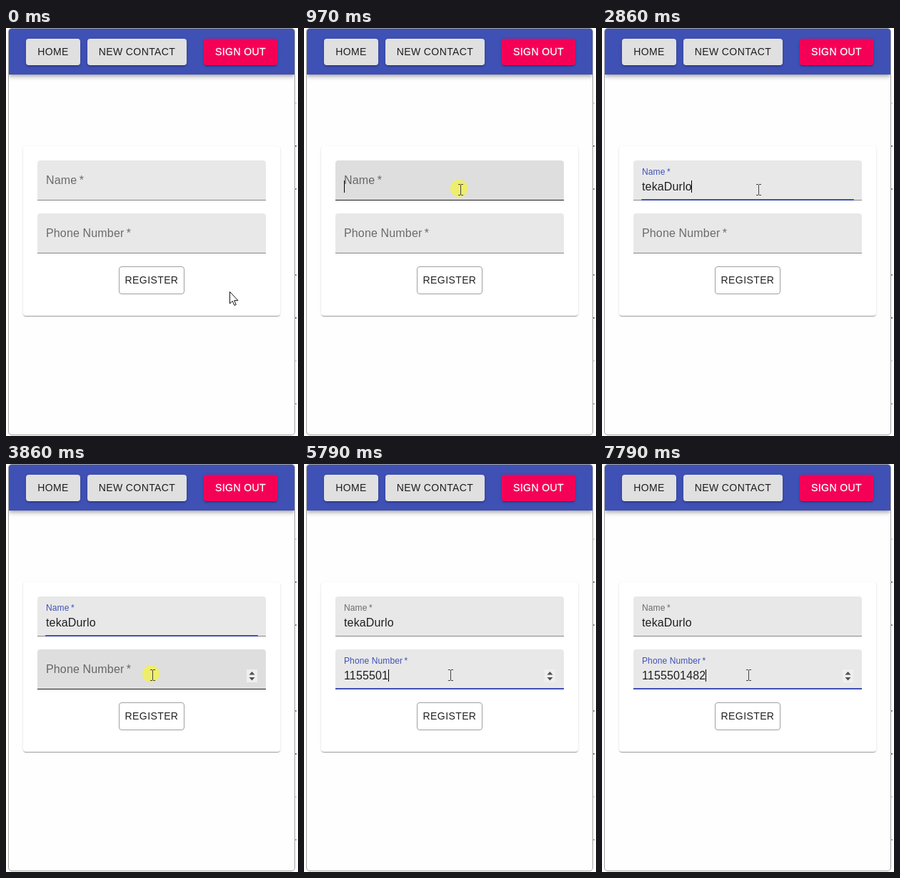
These frames come from a looping animation (409x570 px, 7.99 s). An HTML page:

```html
<!DOCTYPE html>
<html lang="en">
<head>
<meta charset="utf-8">
<title>Contact form</title>
<style>
  html, body { margin: 0; width: 100%; height: 100%; overflow: hidden; background: #fff; }
  body { position: relative; font: 16px/1 "Liberation Sans", Arial, sans-serif; color: rgba(0,0,0,.87); }
  body * { box-sizing: border-box; }
  .stage { position: absolute; left: 0; top: 0; width: 409px; height: 570px; overflow: hidden; }
  .stage div, .stage svg { position: absolute; }
  .speck { left: 405px; width: 2px; height: 2px; background: #777; }
  .page { left: 3px; top: 0; width: 402px; height: 569px; border: 1px solid #a3a3a3; border-radius: 5px; background: #fefefe; overflow: hidden; }
  .bar { left: 0; top: 0; width: 400px; height: 64px; background: #3f51b5;
    box-shadow: 0 2px 4px -1px rgba(0,0,0,.2), 0 4px 5px rgba(0,0,0,.14), 0 1px 10px rgba(0,0,0,.12); }
  .btn { top: 15px; height: 37px; border-radius: 4px; background: #e0e0e0; font-size: 14px; line-height: 37px;
    letter-spacing: .4px; text-align: center; white-space: nowrap;
    box-shadow: 0 3px 1px -2px rgba(0,0,0,.2), 0 2px 2px rgba(0,0,0,.14), 0 1px 5px rgba(0,0,0,.12); }
  .home { left: 28px; width: 76px; }
  .new { left: 114px; width: 139px; }
  .out { left: 277px; width: 103px; background: #f50057; color: #fff; -webkit-text-stroke: .3px #fff; }
  .register { left: 158px; top: 333px; width: 92px; height: 39px; border: 1px solid #a0a0a0; background: #fff; box-shadow: none; }
  .card { left: 24px; top: 165px; width: 360px; height: 237px; border-radius: 4px; background: #fff;
    box-shadow: 0 2px 1px -1px rgba(0,0,0,.2), 0 1px 1px rgba(0,0,0,.14), 0 1px 3px rgba(0,0,0,.12); }
  .field { left: 44px; width: 320px; height: 56px; border-radius: 4px 4px 0 0; letter-spacing: .15px; }
  .label { left: 12px; top: 0; transform-origin: 0 0; white-space: nowrap; }
  .text { left: 12px; top: 27px; line-height: 19px; white-space: pre; }
  .caret { top: 28px; width: 1px; height: 17px; background: #000; }
  .line, .focus { left: 0; bottom: 0; width: 100%; height: 1px; }
  .focus { height: 2px; background: #3f51b5; }
  .spin { left: 337px; top: 287px; width: 15px; height: 18px; background: #efefef; }
  .ring { width: 24px; height: 24px; border-radius: 50%; background: #eeee6c; }
</style>
</head>
<body>
<div class="stage">
  <div class="page"><div class="bar"></div></div>
  <div class="btn home">HOME</div>
  <div class="btn new">NEW CONTACT</div>
  <div class="btn out">SIGN OUT</div>
  <div class="card"></div>
  <div class="btn register">REGISTER</div>
</div>
<template>
  <svg class="spin" viewBox="0 0 15 18"><path d="M3.5 7.5 7.5 3l4 4.5zM3.5 11h8l-4 4.5z" fill="#505050"/></svg>
  <div class="ring"></div>
  <svg class="arrow" width="14" height="21" viewBox="-.5 -.5 14 21"><path d="M0 0V16.5L3.8 13 6.4 19 8.8 18 6.2 12.2H11.5Z" fill="#fff" stroke="#111"/></svg>
  <svg class="beam" width="7" height="16" viewBox="0 0 7 16"><path d="M0 .5H3M4 .5H7M3.5 1V15M0 15.5H3M4 15.5H7" fill="none" stroke="#444"/></svg>
</template>
<script>
const LOOP = 7990, TICK = 70, BLINK = 530;
const stage = document.querySelector('.stage');
const clamp = v => Math.min(1, Math.max(0, v));
const mix = (a, b, p) => a + (b - a) * p;
const show = (el, on) => { el.style.display = on ? 'block' : 'none'; };
const move = (el, x, y) => { el.style.transform = `translate(${x}px,${y}px)`; };

function add(parent, cls, text = '') {
  const el = document.createElement('div');
  el.className = cls;
  el.textContent = text;
  parent.append(el);
  return el;
}

// Bits of the page behind, at the right edge
for (let i = 0; i < 8; i++) {
  const s = add(stage, 'speck').style;
  s.top = 104 + 60 * i + 'px';
  s.opacity = Math.abs(Math.sin((i + .3) * Math.PI / 3.3));
}

// runs: typing at an even pace between points of [time, characters]
const fields = [
  { label: 'Name', top: 185, value: 'tekaDurlo', hover: [350, 3390], focus: [970, 3870], reach: .93,
    runs: [[1840, 2], [2860, 9]] },
  { label: 'Phone Number', top: 259, value: '1155501482', hover: [3460, LOOP], focus: [3870, LOOP], reach: 1,
    runs: [[4330, 1], [5790, 7], [7790, 10]] }
];

for (const f of fields) {
  f.box = add(stage, 'field');
  f.box.style.top = f.top + 'px';
  f.line = add(f.box, 'line');
  f.blue = add(f.box, 'focus');
  f.name = add(f.box, 'label', f.label + '\u2009*');
  f.text = add(f.box, 'text');
  f.caret = add(f.box, 'caret');
  // Time of each keystroke, by the number of characters it leaves
  f.keys = [];
  f.runs.forEach(([t, n], i) => {
    const [t0, n0] = f.runs[i - 1] || [t, n - 1];
    for (let k = n0 + 1; k <= n; k++) f.keys[k] = mix(t0, t, (k - n0) / (n - n0));
  });
}

stage.append(document.querySelector('template').content);
const [spin, ring, arrow, beam] = ['spin', 'ring', 'arrow', 'beam'].map(c => stage.querySelector('.' + c));

// cubic-bezier(0, 0, .2, 1)
function easeOut(x) {
  let lo = 0, hi = 1;
  for (let i = 0; i < 20; i++) {
    const s = (lo + hi) / 2;
    if (.6 * s * s + .4 * s ** 3 < x) lo = s; else hi = s;
  }
  return 3 * lo * lo - 2 * lo ** 3;
}

const ramp = (t, from, length = 200) =>
  easeOut(clamp(Math.floor((t - from + 15) / TICK) * TICK / length));
const fade = (t, [a, b]) => t < b ? ramp(t, a) : 1 - ramp(t, b);

function drawField(f, t) {
  const focus = fade(t, f.focus), hover = fade(t, f.hover) * (1 - focus);
  const shrink = ramp(t, f.focus[0]);
  f.box.style.background = `rgba(0,0,0,${mix(.09, .13, hover)})`;
  f.line.style.background = `rgba(0,0,0,${mix(.42, .87, hover)})`;
  f.blue.style.transform = `scaleX(${focus * f.reach})`;
  f.name.style.transform = `translateY(${mix(20, 10, shrink)}px) scale(${mix(1, .75, shrink)})`;
  f.name.style.color = `rgba(${63 * focus},${81 * focus},${181 * focus},${mix(.54, 1, focus)})`;

  const count = Math.max(0, f.keys.findLastIndex(k => k <= t));
  f.text.textContent = f.value.slice(0, count);
  f.caret.style.left = 12 + Math.floor(f.text.getBoundingClientRect().width) + 'px';
  // Each keystroke restarts the blink
  const idle = t - (count ? f.keys[count] : f.focus[0]);
  show(f.caret, idle >= 0 && t < f.focus[1] && idle % (2 * BLINK) < BLINK);
}

// Each glide leads on from the one before: start, length, x, y
const glides = [[0, TICK, 284, 300], [280, 250, 219, 225], [3390, 250, 205, 294]];

function drawPointer(t) {
  let x = 313, y = 368;
  for (const [at, length, gx, gy] of glides) {
    const p = at ? ramp(t, at - TICK, length) : +(t >= TICK);
    x = Math.round(mix(x, gx, p));
    y = Math.round(mix(y, gy, p));
  }
  const typing = t >= 280 && fields.some(f => y >= f.top && y < f.top + 56);
  show(arrow, !typing);
  show(beam, typing);
  show(ring, fields.some(f => Math.abs(t - f.focus[0] - 35) < 105));
  show(spin, t >= fields[1].hover[0]);
  move(arrow, x, y);
  move(beam, x - 3, y - 7);
  move(ring, x - 14, y - 13);
}

const start = performance.now();
function draw() {
  const t = (performance.now() - start) % LOOP;
  fields.forEach(f => drawField(f, t));
  drawPointer(t);
  requestAnimationFrame(draw);
}
draw();
</script>
</body>
</html>
```
